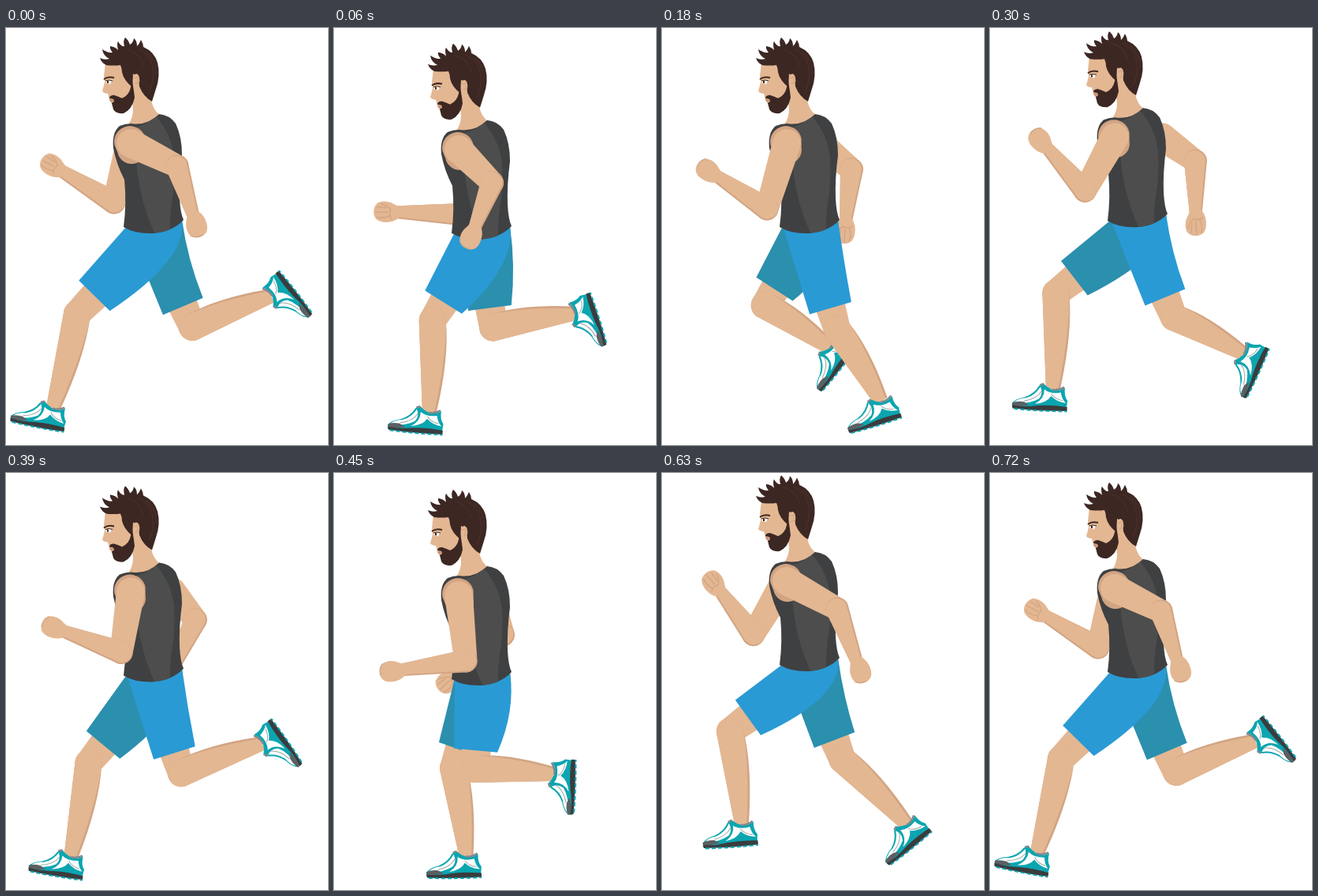
Write an HTML page with a canvas that moves like this. It is 408 px wide and 528 px high and loops after 750 ms.

```html
<!DOCTYPE html>
<html lang="en">
<head>
<meta charset="utf-8">
<title>Runner</title>
<style>
html, body { margin: 0; width: 100%; height: 100%; overflow: hidden; background: #fff; }
canvas { display: block; }
</style>
</head>
<body>
<canvas id="stage" width="408" height="528"></canvas>
<script>
const ctx = document.getElementById('stage').getContext('2d');
const STEP = 30, LOOP = 750, STRIDE = 720, TURN = 2 * Math.PI;
const SKIN = '#e3b792', SHADE = '#d2a483', HAIR = '#3c2723';
const BLUE = '#2a9ad4', TEAL = '#2b8fae', SHIRT = '#3f4041', PANEL = '#4d4d4d';

// Key poses at equal eighths of a stride; both sides of the body share them.
// Leg: knee, ankle, shoe angle in degrees.
const LEG = [
  [90, 362, 55, 480, 11], [147, 373, 156, 485, 0], [222, 382, 273, 474, -17],
  [228, 363, 304, 452, -35], [236, 379, 339, 343, -128], [178, 375, 278, 386, -88],
  [110, 340, 175, 418, -35], [86, 327, 96, 445, -4]];
// Arm: elbow, hand.
const ARM = [
  [217, 175, 241, 249], [188, 207, 138, 262], [133, 229, 59, 181], [117, 204, 66, 139],
  [136, 220, 59, 171], [167, 238, 74, 251], [181, 216, 130, 283], [222, 172, 251, 250]];

const wave = t => Math.sin(TURN * t / STRIDE);
const bounce = t => 1 + 9 * wave(2 * t);
const farShoulder = t => 185 - 32 * Math.cos(TURN * (t + 50) / STRIDE);
// The far side runs half a stride apart, with a small lead or lag mid-swing.
const farPhase = (t, shift, lead) => t + STRIDE / 2 + shift + lead * wave(t) ** 5;

// Smooth cyclic curve through evenly spaced poses.
function pose(keys, t) {
  const n = keys.length, x = (t / STRIDE + 1) * n, i = Math.floor(x), s = x - i;
  const [a, b, c, d] = [-1, 0, 1, 2].map(k => keys[(i + k) % n]);
  return b.map((v, j) => v + s / 2 * (c[j] - a[j] +
    s * (2 * a[j] - 5 * v + 4 * c[j] - d[j] + s * (3 * (v - c[j]) + d[j] - a[j]))));
}

function fill(path, color) {
  ctx.fillStyle = color;
  ctx.fill(typeof path === 'string' ? new Path2D(path) : path);
}

function stroke(path, color, width) {
  ctx.strokeStyle = color;
  ctx.lineWidth = width;
  ctx.stroke(typeof path === 'string' ? new Path2D(path) : path);
}

function axis(a, b) {
  const dx = b[0] - a[0], dy = b[1] - a[1], len = Math.hypot(dx, dy);
  return { u: [dx / len, dy / len], n: [-dy / len, dx / len], len, angle: Math.atan2(dy, dx) };
}

const along = (o, ax, a, b) =>
  [o[0] + ax.u[0] * a + ax.n[0] * b, o[1] + ax.u[1] * a + ax.n[1] * b];

function taper(a, ra, b, rb, color) {
  const { angle } = axis(a, b), q = TURN / 4, p = new Path2D();
  p.arc(...a, ra, angle + q, angle - q);
  p.arc(...b, rb, angle - q, angle + q);
  p.closePath();
  fill(p, color);
}

function shank(knee, ankle, trim, color) {
  const ax = axis(knee, ankle), q = TURN / 4, p = new Path2D();
  p.arc(...knee, 17, ax.angle - q, ax.angle + q, true);
  p.lineTo(...along(ankle, ax, 0, 9));
  p.lineTo(...along(ankle, ax, 0, trim - 9));
  p.quadraticCurveTo(...along(knee, ax, ax.len * .4, trim * 1.5 - 23), ...along(knee, ax, 0, -17));
  fill(p, color);
}

function shoe(ankle, angle) {
  ctx.save();
  ctx.translate(...ankle);
  ctx.rotate(angle);
  fill('M-46 21Q-43 15-30 12Q-18 7-13-3L-7-6Q2 3 14 1L20-2Q19 8 24 14L23 25L-45 26Z', '#0ba5b0');
  fill('M-43 19Q-38 14-28 13Q-17 9-11-2Q-7 6-12 13Q-22 20-43 21Z', '#fff');
  fill('M-6 1Q2 7 15 4Q17 13 22 17Q10 16 3 9Q-2 18-17 20Q-5 13-6 1Z', '#fff');
  stroke('M-31 17Q-15 14-9 3M3 6Q8 13 18 14', '#9aa5a8', 1);
  stroke('M-12-4L-7-6M4 1Q12 2 19-3', '#7f898d', 2.5);
  fill('M-46 20Q-40 17-31 18L-24 22L-45 25Z', '#5b6063');
  fill('M-46 23Q-30 25-14 22Q4 20 24 22L24 27Q-10 29-45 27Z', '#3a3c3e');
  ctx.setLineDash([5, 3]);
  stroke('M-43 27.5Q-10 29 24 27.5', '#0ba5b0', 2);
  ctx.restore();
}

function leg(phase, bob, cloth) {
  const [kx, ky, ax, ay, deg] = pose(LEG, phase);
  const hip = [187, 262 + bob], knee = [kx, ky], rot = deg * TURN / 360;
  const ankle = [ax + 5 * Math.cos(rot), ay + 5 * Math.sin(rot)];
  const thigh = axis(hip, knee);
  taper(hip, 25, knee, 17, SKIN);
  shank(knee, ankle, 0, SHADE);
  shank(knee, ankle, 2.5, SKIN);
  shoe([ax, ay], rot);

  const hem = thigh.len * .77, shorts = new Path2D();
  shorts.moveTo(153, 250 + bob);
  shorts.lineTo(...along(hip, thigh, hem, 28));
  shorts.lineTo(...along(hip, thigh, hem, -27));
  shorts.quadraticCurveTo(230, 292 + bob, 223, 242 + bob);
  shorts.closePath();
  fill(shorts, cloth);
}

function arm(phase, bob, shoulderX, far) {
  const [ex, ey, hx, hy] = pose(ARM, phase);
  const shoulder = [shoulderX, 143 + bob], elbow = [ex + (shoulderX - 157) * .6, ey], hand = [hx, hy];
  const fore = axis(elbow, hand), wrist = along(hand, fore, -13, 0);
  if (!far) taper(shoulder, 20, [shoulderX + 2, shoulder[1] + 10], 18, SHADE);
  taper([shoulderX + 1, shoulder[1] + 2], 18, elbow, 14.5, SKIN);
  taper(elbow, 14.5, wrist, 8, SHADE);
  taper(along(elbow, fore, 0, 1), 13.5, along(wrist, fore, 0, 1), 7, SKIN);

  ctx.save();
  ctx.translate(...hand);
  ctx.rotate(fore.angle);
  fill('M-16-7Q-8-14 4-13Q14-12 16-4Q18 5 12 11Q4 15-5 12Q-11 9-16 7Z', SKIN);
  if (far) stroke('M-4-5Q3-9 13-7M-2 0L15-1M0 5L13 6M-7-9Q-2-4-5 3Q0 9 8 10', SHADE, 1.3);
  else stroke('M15-4Q17 5 11 11', SHADE, 1.2);
  ctx.restore();
}

function neckAndTorso() {
  fill('M157 68L178 72L184 90Q186 103 196 110Q180 129 155 121Q161 113 161 102Z', SKIN);
  const body = new Path2D('M144 123Q151 120 159 120Q179 123 194 108Q207 109 215 120' +
    'Q223 137 223 160Q219 190 220 215Q221 234 225 242Q211 257 186 259Q164 260 149 251' +
    'Q153 221 150 191Q140 172 136 151Q134 131 144 123Z');
  fill(body, SHIRT);
  ctx.save();
  ctx.clip(body);
  fill('M162 125Q178 123 189 110Q210 133 213 164Q215 190 210 220Q207 240 208 262L190 262Q169 220 165 166Z', PANEL);
  ctx.restore();
}

function head() {
  fill('M126 43L124 60L125 68L122 79Q124 82 129 82L131 90L136 98L160 92L172 76L170 42L145 36Z', SKIN);
  fill('M127 46Q121 43 119 37Q125 40 131 38Q123 34 122 26Q129 31 135 30Q131 25 132 22Q139 23 142 27' +
    'Q140 19 142 16Q146 23 150 22Q148 15 151 11Q155 14 157 20Q161 18 162 12Q166 15 166 22' +
    'Q169 19 171 14Q174 19 174 23Q188 29 192 43Q196 59 190 76L185 92Q174 86 169 73L168 60' +
    'L161 57L160 74Q149 65 147 55Q147 50 145 46Q136 47 127 46Z', HAIR);
  stroke('M153 26Q170 30 174 47M167 26Q184 32 186 52Q188 67 181 80M178 29Q190 39 190 58', '#4b302b', 1.2);
  fill('M160 66Q162 78 163 87Q160 102 149 107Q139 108 136 102L134 94L137 92L136 89L131 88' +
    'Q131 84 137 84Q143 86 147 88Q156 84 158 74Z', HAIR);
  fill('M131 89L137 90L134 93L132 92Z', '#c98e78');
  fill('M161 62Q164 54 168 59Q171 66 167 71Q164 74 162 69Z', SKIN);
  stroke('M163 63Q166 58 167 64Q168 68 164 70', SHADE, 1.2);
  fill('M126 67Q130 64 134 66L132 70L127 69Z', '#fff');
  fill('M128 66H130V69H128Z', HAIR);
  stroke('M126 66Q130 64 135 66', HAIR, 1);
  stroke('M124 64Q129 60 137 62', HAIR, 2);
}

function shifted(bob, part) {
  ctx.save();
  ctx.translate(0, bob);
  part();
  ctx.restore();
}

function draw(now) {
  const t = Math.floor(now % LOOP / STEP) * STEP % STRIDE, bob = bounce(t);
  ctx.fillStyle = '#fff';
  ctx.fillRect(0, 0, 408, 528);
  arm(farPhase(t, 5, 65), bob, farShoulder(t), true);
  leg(farPhase(t, 0, -30), bob, TEAL);
  leg(t, bob, BLUE);
  shifted(bob, neckAndTorso);
  arm(t, bob, 157, false);
  shifted(bob, head);
}

const start = performance.now();
function tick() {
  draw(performance.now() - start);
  requestAnimationFrame(tick);
}
tick();
</script>
</body>
</html>
```
